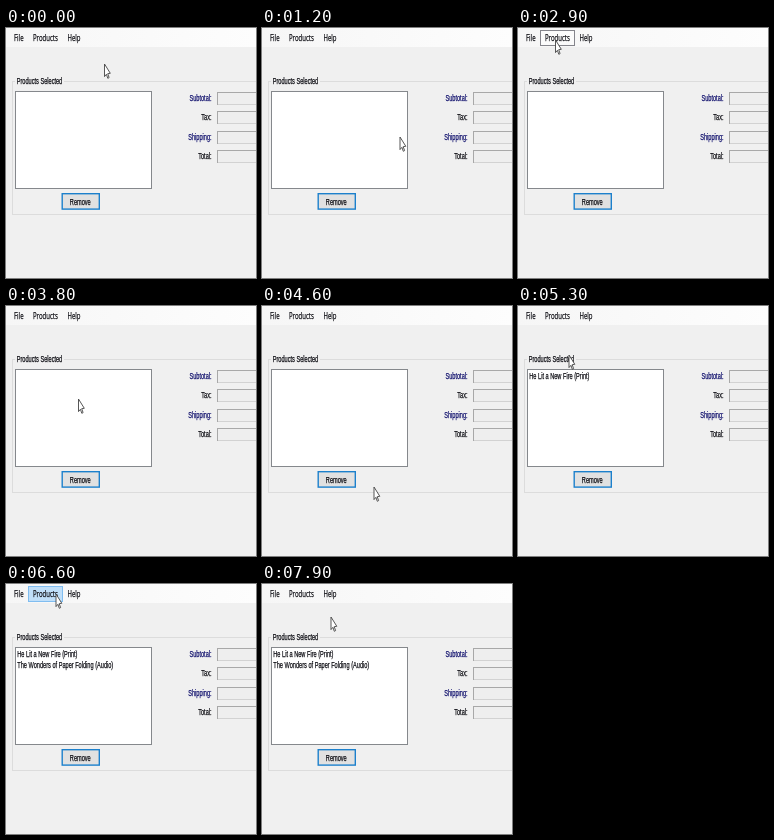
Animation, 250 px wide and 250 px high, one loop 8 s. Source, as an HTML page with a canvas:

```html
<!DOCTYPE html>
<html lang="en">
<head>
<meta charset="utf-8">
<title>Order form</title>
<style>
  html, body { margin: 0; width: 100%; height: 100%; overflow: hidden; background: #f0f0f0; }
  canvas { display: block; width: 250px; height: 250px; }
</style>
</head>
<body>
<canvas id="stage" width="250" height="250"></canvas>
<script>
const ctx = document.getElementById('stage').getContext('2d');
const LOOP = 8000, STEP = 100, MOVE = 400;
const SQUEEZE = 0.66;
const BODY = '8.5px "Liberation Sans", Arial, sans-serif';
const MENU = '9.1px "Open Sans", "Noto Sans", sans-serif';
const INK = '#0e0e14', NAVY = '#12126e', FACE = '#f0f0f0';

// The pointer rests at each stop, then glides so as to reach the next on time.
const stops = [
  { at: 0, x: 98.5, y: 36 },
  { at: 900, x: 138, y: 109 },
  { at: 1600, x: 14, y: 11 },
  { at: 2000, x: 21, y: 19 },
  { at: 2200, x: 37.5, y: 12 },
  { at: 3800, x: 72.5, y: 93 },
  { at: 4500, x: 112, y: 181 },
  { at: 5100, x: 51, y: 49 },
  { at: 5700, x: 42, y: 11 },
  { at: 6200, x: 112, y: 201 },
  { at: 6600, x: 50, y: 10 },
  { at: 7300, x: 86, y: 150 },
  { at: 7900, x: 69, y: 33 }
];

const menus = [
  { text: 'File', left: 3, right: 21 },
  { text: 'Products', left: 22, right: 56 },
  { text: 'Help', left: 56.5, right: 79 }
];

const items = [
  { text: 'He Lit a New Fire (Print)', at: 4700 },
  { text: 'The Wonders of Paper Folding (Audio)', at: 6300 }
];

const totals = [
  { text: 'Subtotal:', color: NAVY },
  { text: 'Tax:', color: INK },
  { text: 'Shipping:', color: NAVY },
  { text: 'Total:', color: INK }
];

function label(text, x, y, { font = BODY, color = INK, align = 'left' } = {}) {
  ctx.save();
  ctx.translate(x, y);
  ctx.scale(SQUEEZE, 1);
  ctx.font = font;
  ctx.textAlign = align;
  ctx.fillStyle = ctx.strokeStyle = color;
  ctx.lineWidth = 0.25;
  ctx.fillText(text, 0, 0);
  ctx.strokeText(text, 0, 0);
  ctx.restore();
}

function rect(x, y, w, h, color) {
  ctx.fillStyle = color;
  ctx.fillRect(x, y, w, h);
}

function frame(x, y, w, h, edge, fill, line = 1) {
  rect(x, y, w, h, edge);
  rect(x + line, y + line, w - 2 * line, h - 2 * line, fill);
}

function pointerAt(t) {
  const i = stops.findLastIndex(stop => stop.at <= t);
  const a = stops[i], b = stops[i + 1] || a;
  const span = Math.min(MOVE, b.at - a.at) || 1;
  const p = Math.min(1, Math.max(0, 1 - (b.at - t) / span));
  const k = p * p * (3 - 2 * p);
  return { x: a.x + (b.x - a.x) * k, y: a.y + (b.y - a.y) * k };
}

function drawMenu(t, pointer) {
  const bar = ctx.createLinearGradient(0, 0, 250, 0);
  bar.addColorStop(0, '#f6f6f6');
  bar.addColorStop(1, '#fdfdfd');
  rect(0, 0, 250, 19, bar);
  const open = t >= 1800 && t < 3800;
  for (const { text, left, right } of menus) {
    const hot = pointer.y < 20 && pointer.x >= left && pointer.x <= right;
    if (hot && open) frame(left, 2, right - left + 1, 16, '#85858c', '#fbfbfb');
    else if (hot) frame(left, 2, right - left + 1, 16, '#80bdf0', '#c0dff9');
    label(text, left + 5, 12.8, { font: MENU });
  }
}

function drawForm(t) {
  frame(6, 53, 260, 134, '#dcdcdc', FACE);
  rect(9, 50, 49, 8, FACE);
  label('Products Selected', 10.7, 56.3);

  frame(9, 63, 137, 98, '#85888c', '#fff');
  items.forEach(({ text, at }, i) => {
    if (t >= at) label(text, 11.3, 73.4 + 10.4 * i);
  });

  frame(55.5, 165, 38.5, 16.8, '#1c80cc', '#e1e1e1', 1.4);
  label('Remove', 74.3, 176.6, { align: 'center' });

  totals.forEach(({ text, color }, i) => {
    const top = Math.round(64 + 19.4 * i);
    label(text, 205.6, top + 9.2, { color, align: 'right' });
    frame(211, top, 50, 13, '#d2d2d2', '#eeeeee');
    rect(211, top, 50, 1, '#a8a8a8');
    rect(211, top, 1, 13, '#a8a8a8');
  });
}

function drawPointer({ x, y }) {
  const shape = [[0, 0], [0, 12.6], [1.9, 10.3], [3.3, 14.3], [4.6, 13.6], [3.2, 9.7], [5.8, 9.3]];
  ctx.beginPath();
  for (const [dx, dy] of shape) ctx.lineTo(x + dx, y + dy);
  ctx.closePath();
  ctx.fillStyle = '#fff';
  ctx.fill();
  ctx.lineWidth = 0.9;
  ctx.lineJoin = 'round';
  ctx.strokeStyle = '#444';
  ctx.stroke();
}

const start = performance.now();

function draw() {
  const elapsed = Math.max(0, performance.now() - start) % LOOP;
  const t = Math.floor(elapsed / STEP) * STEP;
  const pointer = pointerAt(t);
  rect(0, 0, 250, 250, FACE);
  drawMenu(t, pointer);
  drawForm(t);
  drawPointer(pointer);
  requestAnimationFrame(draw);
}
draw();
</script>
</body>
</html>
```
